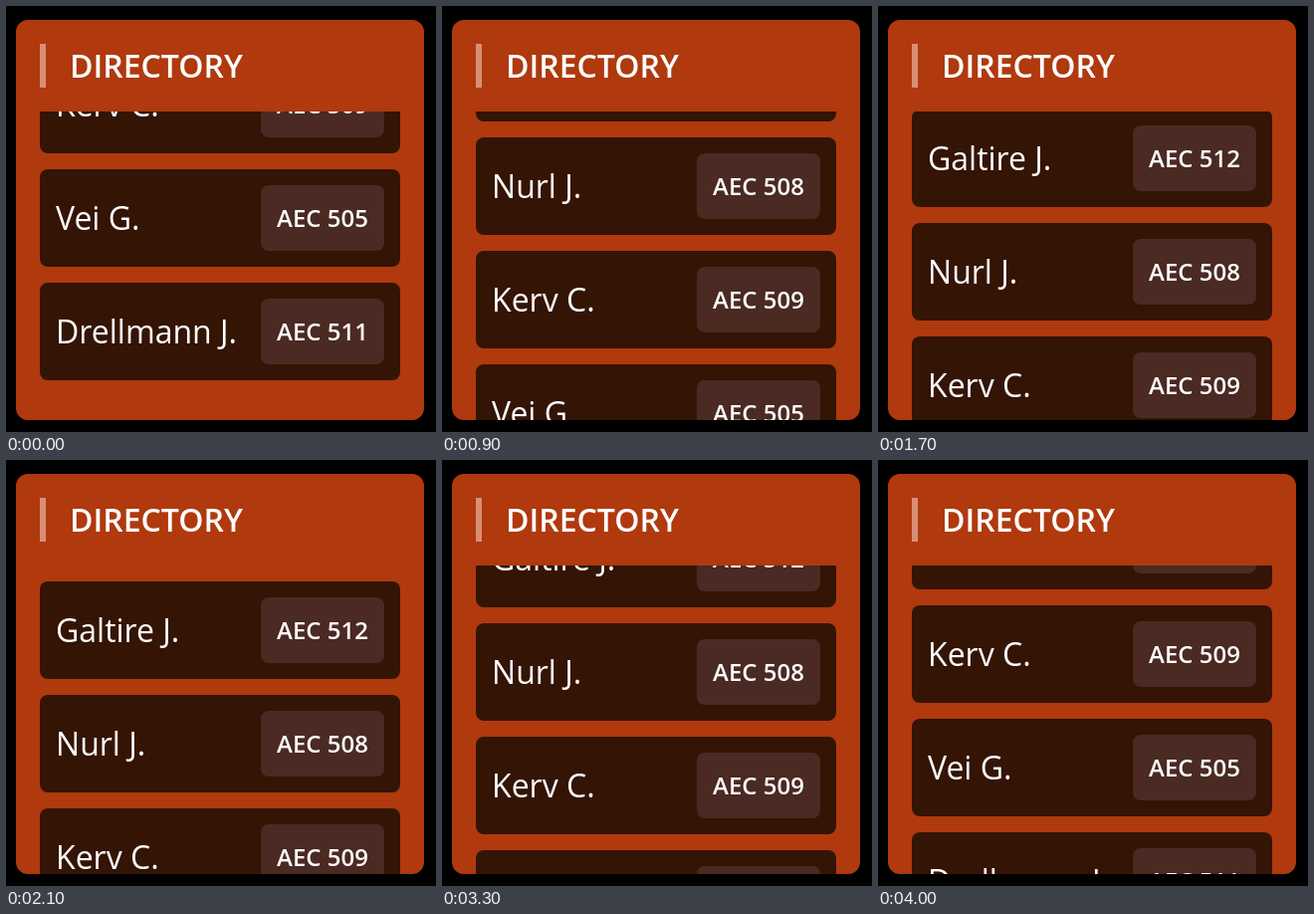
Animation, 432 px wide and 428 px high, one loop 4.1 s. Source, as an HTML page:

```html
<!DOCTYPE html>
<html lang="en">
<head>
<meta charset="utf-8">
<title>Directory</title>
<style>
  html, body { margin: 0; width: 100%; height: 100%; overflow: hidden; background: #000; }
  svg { display: block; width: 100vw; height: 100vh; }
  text { fill: #fff; font-family: "Open Sans", "Noto Sans", sans-serif; }
  .title { font-size: 32px; font-weight: 600; }
  .name { font-size: 32px; }
  .room { font-size: 24px; font-weight: 600; text-anchor: middle; }
</style>
</head>
<body>
<svg viewBox="0 0 432 428">
  <clipPath id="view"><rect x="10" y="106" width="410" height="310"/></clipPath>
  <rect x="10" y="14" width="410" height="402" rx="12" fill="#b0390e"/>
  <rect x="34" y="38" width="6" height="44" fill="#d98f76"/>
  <text class="title" x="64" y="72">DIRECTORY</text>
  <g clip-path="url(#view)"><g id="list"></g></g>
</svg>
<script>
const LOOP = 4100, STEP = 100, RETURN_AT = 3000;
const ROW_TOP = 130, PITCH = 114, MAX_SCROLL = 308, POWER = 2.7;

const people = [
  ["Galtire J.", 512],
  ["Nurl J.", 508],
  ["Kerv C.", 509],
  ["Vei G.", 505],
  ["Drellmann J.", 511]
];

// Decelerating glide: [ms since start, distance left]
const glide = [
  [0, 308], [300, 228], [500, 182], [900, 112], [1000, 96],
  [1700, 26], [1800, 20], [2400, 2.2], [2500, 1.2], [2600, 0]
];

const list = document.getElementById("list");

function add(parent, tag, attrs, label) {
  const el = document.createElementNS("http://www.w3.org/2000/svg", tag);
  for (const key in attrs) el.setAttribute(key, attrs[key]);
  if (label) el.textContent = label;
  return parent.appendChild(el);
}

people.forEach(([name, room], i) => {
  const row = add(list, "g", { transform: `translate(34 ${ROW_TOP + i * PITCH})` });
  add(row, "rect", { width: 362, height: 98, rx: 8, fill: "#341405" });
  add(row, "text", { class: "name", x: 16, y: 61 }, name);
  add(row, "rect", { x: 222, y: 16, width: 124, height: 66, rx: 8, fill: "#4a2a22" });
  add(row, "text", { class: "room", x: 284, y: 58 }, "AEC " + room);
});

// Interpolates along a power curve, snapped to the two-pixel scroll grid.
function distanceLeft(t) {
  const next = glide.findIndex(([time]) => time > t);
  if (next < 0) return 0;
  const [t0, d0] = glide[next - 1], [t1, d1] = glide[next];
  const a = d0 ** (1 / POWER), b = d1 ** (1 / POWER);
  const d = (a + (b - a) * (t - t0) / (t1 - t0)) ** POWER;
  return Math.round(d / 2) * 2;
}

function scrollAt(t) {
  return t < RETURN_AT ? distanceLeft(t) : MAX_SCROLL - distanceLeft(t - RETURN_AT);
}

function draw(ms) {
  const t = Math.floor((ms % LOOP) / STEP) * STEP;
  list.setAttribute("transform", `translate(0 ${-scrollAt(t)})`);
}

let start;
function tick(now) {
  start ??= now;
  draw(now - start);
  requestAnimationFrame(tick);
}
draw(0);
requestAnimationFrame(tick);
</script>
</body>
</html>
```
